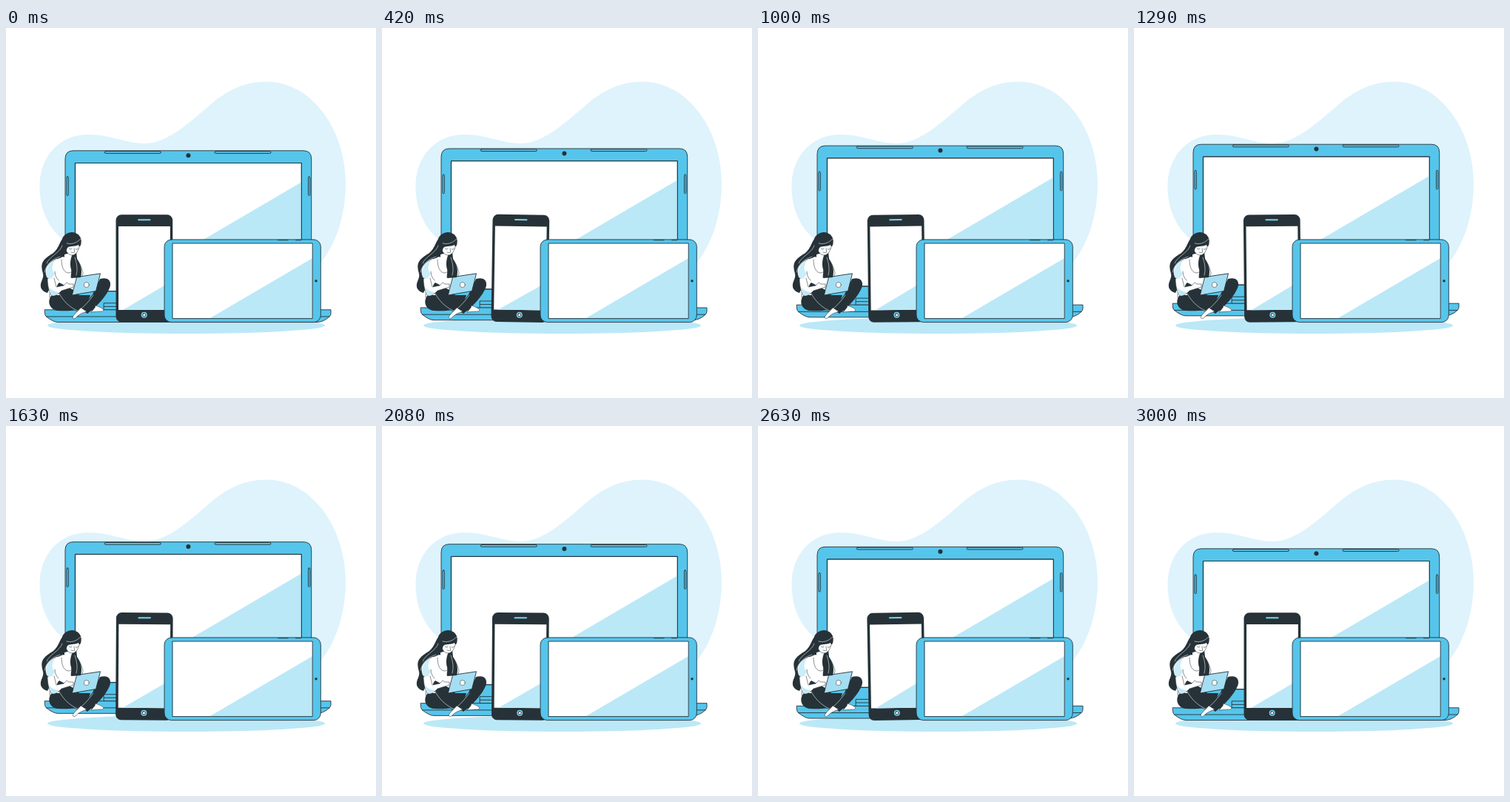
Animation, 500 px wide and 500 px high, one loop 3.04 s. Source, as an HTML page:

```html
<!DOCTYPE html>
<html lang="en">
<head>
<meta charset="utf-8">
<title>Devices</title>
<style>
  html, body { margin: 0; width: 100%; height: 100%; overflow: hidden; background: #fff; }
  svg { display: block; width: 100vw; height: 100vh; }
  .blue { fill: #56c5eb; }
  .pale { fill: #bbe8f7; }
  .white { fill: #fff; }
  .dark { fill: #263238; }
  .line { stroke: #263238; stroke-width: .9; stroke-linejoin: round; stroke-linecap: round; }
  .thin { stroke: #263238; stroke-width: .55; stroke-linejoin: round; stroke-linecap: round; }
  .gap { fill: none; stroke: #fff; stroke-width: .55; stroke-linecap: round; }
  .open { fill: none; }
</style>
</head>
<body>
<svg viewBox="0 0 500 500">
  <path fill="#def3fc" d="M45.500 215C45.500 172 73 144 112 144C141 144 163 156 187 156C216 156 243 132 270 109C293 88 318 72.500 352 72.500C414 72.500 459 139 459 209C459 252 447 290 425 318L390 350H110L96 298C63 283 45.500 251 45.500 215Z"/>
  <ellipse class="pale" cx="243.500" cy="402" rx="187.500" ry="11"/>

  <g id="laptop">
    <path class="blue line" d="M80 381V177Q80 165.800 91 165.800H402Q412.700 165.800 412.700 177V381Z"/>
    <path class="white line" d="M93.700 182.500H399.300V355.500H93.700Z"/>
    <path class="pale" d="M398.900 208.600V355.100H149Z"/>
    <path class="line open" d="M93.700 355.500V182.500H399.300V355.500Z"/>
    <g class="blue line">
      <rect x="133.300" y="166.600" width="76" height="2.800" rx="1.400"/>
      <rect x="282" y="166.600" width="76" height="2.800" rx="1.400"/>
      <rect x="82" y="201" width="2.300" height="25.500" rx="1.100"/>
      <rect x="408.500" y="201" width="2.300" height="25.500" rx="1.100"/>
      <path d="M132.500 371.800H360V381H132.500ZM132.500 376.400H360"/>
      <path d="M52.500 380.800H439V386Q439 388 437 390Q429 397.500 420 397.500H70Q64 397.500 54.500 390Q52.500 388 52.500 386Z"/>
      <path class="open" d="M54.500 390H437"/>
    </g>
    <circle class="dark" cx="246.400" cy="172.200" r="3"/>
  </g>

  <g id="phone">
    <rect class="dark" x="148.500" y="252.300" width="76.700" height="145.200" rx="7.500"/>
    <path class="white" d="M152 268H221.800V381H152Z"/>
    <path class="pale" d="M221.800 343.600V381H158Z"/>
    <path fill="none" stroke="#7cd2ef" stroke-width="2" stroke-linecap="round" d="M179 259.200H194.500"/>
    <circle cx="186.700" cy="387.800" r="4" fill="#7cd2ef"/>
    <rect class="white line" x="184.800" y="385.900" width="3.800" height="3.800" rx=".8"/>
  </g>

  <g>
    <rect class="blue line" x="214" y="285.900" width="211.300" height="111.700" rx="9.500"/>
    <path class="white" d="M225.300 291H414.200V392.600H225.300Z"/>
    <path class="pale" d="M414.200 311V392.600H275Z"/>
    <path class="line open" d="M225.300 291H414.200V392.600H225.300Z"/>
    <path class="line" stroke-linecap="round" d="M367.500 286.700H381M391.500 286.700H398.500"/>
    <circle class="dark" cx="419" cy="341.800" r="1.700"/>
  </g>

  <g>
    <!-- back hair -->
    <path class="dark" d="M80 280C72 288 72 297 64 304C54 310 47 315 48.500 325C49 331 52 333 49 340C45 348 46 355 56 358L62 346L70 316L88 306L94 290Z"/>
    <!-- torso and arms -->
    <path class="white thin" d="M77 309C68 311 60 315 56 321C52 326 53 332 55 337L59 340C62 347 59 355 59 364H98L101 342L104 331C102 322 99 315 93 311Z"/>
    <path fill="#c9edf9" d="M66 314C58 317 53 325 55 336L61 340L66 332C61 327 62 320 66 314ZM61 341L66 344L60 356Z"/>
    <path class="thin open" d="M75 313C75 323 78 331 85 331C90 331 92 324 92 318M66 329C66 334 68 338 71 341"/>
    <path class="white" d="M79 306V313Q84 319 90 313L91 303Z"/>
    <!-- legs -->
    <path class="dark" d="M62 361C55 368 58 381 70 382C83 383 99 382 109 376L114 361Z"/>
    <path class="dark" d="M127 339C137 336 143 341 140.500 350C136 362 124 375 110 386L101 380C107 373 112 367 117 360Z"/>
    <path class="dark" d="M72 344C66 349 69 357 76 366C83 375 89 380 96 383L104 378L119 383L123 375C111 370 99 362 91 354Z"/>
    <path class="gap" d="M69 352C74 367 87 379 99 383M102 379C108 374 113 368 118 361"/>
    <!-- feet -->
    <path class="white thin" d="M101 378L109 383C104 385 98 387 95 391C92 394 89 393 91 389C94 385 98 382 101 378Z"/>
    <path class="white thin" d="M121 375C126 377 130 378 132 381Q131 384 127 383L115 384L120 378Z"/>
    <!-- forearm -->
    <path class="white thin" d="M56 339C56 347 58 356 61 361C64 364 70 360 75 355L91 350L91 346L85 346L82 344L78 348L68 350L65 338"/>
    <path class="pale" d="M58 350L62 361Q66 362 71 357Q62 356 58 350Z"/>
    <!-- small computer -->
    <path class="line" fill="#a4def3" d="M96 336.500L127.500 331.800L121.500 355.500L89.500 361Z"/>
    <circle class="white thin" cx="108.800" cy="347" r="3.500"/>
    <!-- head -->
    <path class="dark" d="M90 305C87 312 86 319 88 326C89 331 87 334 88 338L101 337C104 326 100 318 96 312L95 302Z"/>
    <path class="white thin" d="M80 290C80 300 82 306 89 307C95 307 99 300 100 290Z"/>
    <path class="thin open" d="M85 298Q87 300 89 298.500M94 299Q96 300 97.500 298M92 298L92.500 302M88 303Q91 304.500 93 303"/>
    <path class="dark" d="M76 292C74 281 82 276 90 276C98 277 103 283 101.500 291C101 295 99 297 98 293C92 296 86 294 83 297C81 302 79 307 73 311L64 313Z"/>
    <path class="gap" d="M82 291Q92 294 101 285M76 294C73 304 58 309 55 318M73 309C63 312 55 318 52 330M93 310Q98 324 95 334"/>
  </g>
</svg>
<script>
  const LOOP = 3040, FLOAT = 3000, SWAY = 1500;
  const laptop = document.getElementById('laptop');
  const phone = document.getElementById('phone');

  // Linear interpolation through [position, value] steps.
  function along(steps, p) {
    const i = Math.max(1, steps.findIndex(s => s[0] >= p));
    const [a, from] = steps[i - 1], [b, to] = steps[i];
    return from + (to - from) * (p - a) / (b - a);
  }

  const rise = [[0, 0], [.5, -10], [1, 0]];
  const tilt = [[0, 0], [.25, 1], [.75, -1], [1, 0]];
  const start = performance.now();

  function draw(now) {
    const t = Math.min(Math.max(0, now - start) % LOOP, FLOAT);
    laptop.setAttribute('transform', `translate(0 ${along(rise, t / FLOAT)})`);
    phone.setAttribute('transform', `rotate(${along(tilt, t / SWAY % 1)} 186.85 324.9)`);
    requestAnimationFrame(draw);
  }
  draw(start);
</script>
</body>
</html>
```
